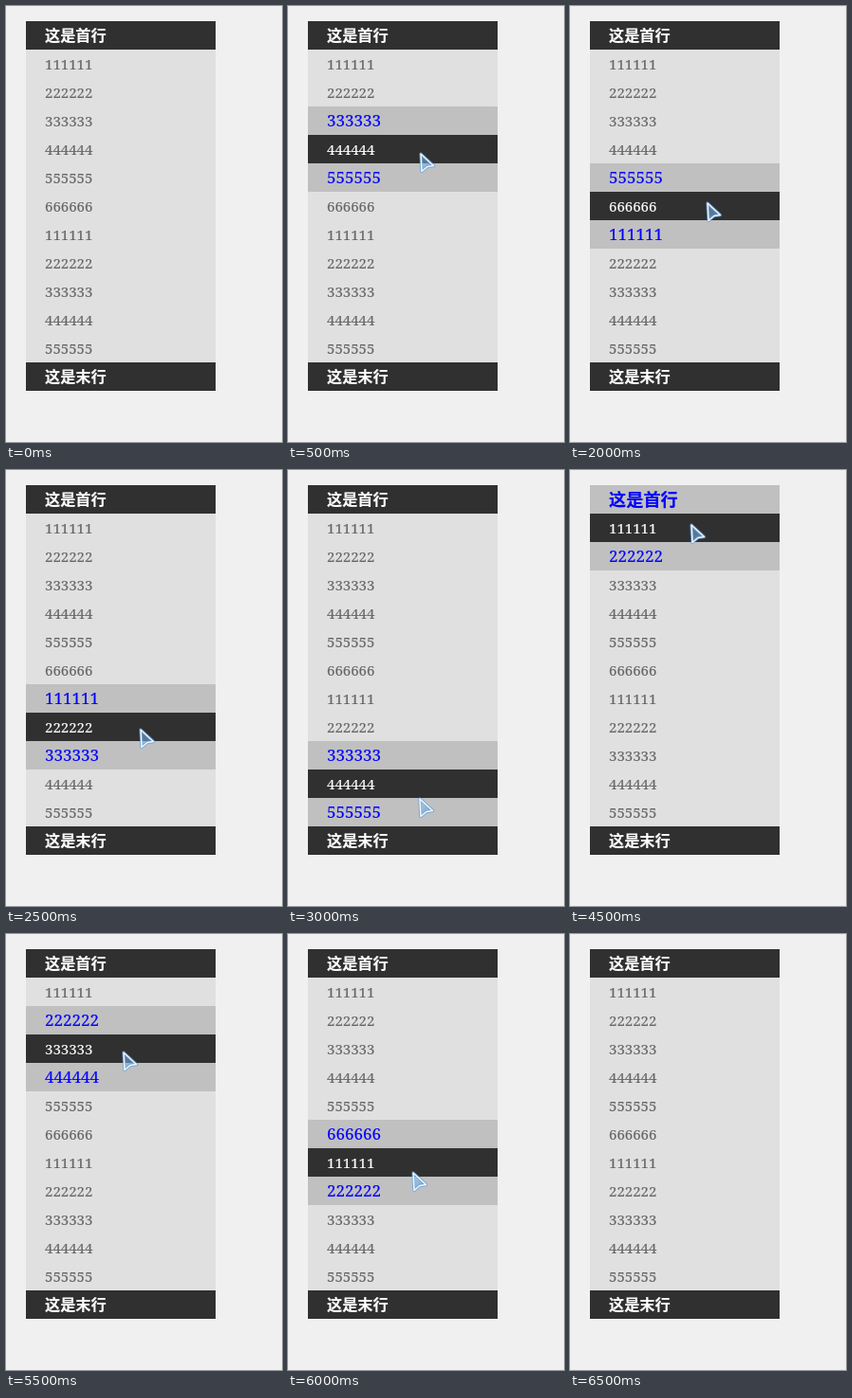
These frames come from a looping animation (291x460 px, 7 s). An HTML page:

```html
<!DOCTYPE html>
<html lang="zh-CN">
<head>
<meta charset="utf-8">
<style>
  html, body { margin: 0; width: 100%; height: 100%; overflow: hidden; background: #f0f0f0; }
  #list { position: absolute; left: 21px; top: 16px; width: 200px; }
  .row {
    box-sizing: border-box; height: 30px; padding-left: 20px; overflow: hidden;
    font: 15px/30px "Noto Serif", serif;
    -webkit-text-stroke: .15px currentColor;
    white-space: nowrap; color: #666; background: #e0e0e0;
  }
  .edge { font: 700 16.2px/28px "Noto Sans CJK SC", "Noto Sans CJK", sans-serif; }
  .edge, .row.hover { color: #fff; background: #303030; }
  .row.near { color: #00f; background: #c0c0c0; font-size: 17px; }
  .edge.near { font-size: 18.2px; }
  #cursor { position: absolute; left: 0; top: 0; overflow: visible; }
</style>
</head>
<body>
<div id="list"></div>
<svg id="cursor" width="20" height="25" viewBox="0 0 20 25">
  <defs>
    <linearGradient id="glass" x1="0" y1="0" x2="1" y2="1">
      <stop offset="0" stop-color="#a4caf0" stop-opacity=".4"/>
      <stop offset="1" stop-color="#4390dc" stop-opacity=".75"/>
    </linearGradient>
    <path id="arrow" d="M2 2 L15.5 14.5 L9 15.5 L3 20.5 Z" stroke-linejoin="round"/>
  </defs>
  <use href="#arrow" fill="none" stroke="#5b9bd5" stroke-opacity=".65" stroke-width="3.4"/>
  <use href="#arrow" fill="url(#glass)" stroke="#eef7ff" stroke-width="1.5"/>
</svg>
<script>
  const LOOP = 7000, BEAT = 500, TOP = 16, ROW = 30;
  const ENTER = 500, LEAVE = 6500, HOLD = 3;   // the pointer rests HOLD beats at its first stop
  const TRAIL = 0.15;                          // the highlight trails the pointer slightly
  const stops = [
    [138, 154], [143, 206], [140, 272], [137, 345], [138, 359],
    [138, 125], [126, 56], [109, 147], [122, 123], [130, 250]
  ];

  const list = document.getElementById('list');
  const cursor = document.getElementById('cursor');
  const digits = Array.from({ length: 11 }, (_, i) => String(i % 6 + 1).repeat(6));
  const rows = ['这是首行', ...digits, '这是末行'].map((text, i, all) => {
    const row = document.createElement('div');
    row.className = i % (all.length - 1) ? 'row' : 'row edge';
    row.textContent = text;
    list.append(row);
    return row;
  });

  function rowUnder(i) {
    const y = stops[i][1];
    const before = stops[Math.max(0, i - 1)][1];
    return Math.floor((y + (before - y) * TRAIL - TOP) / ROW);
  }

  function show(t) {
    const inside = t >= ENTER && t < LEAVE;
    const i = Math.max(0, Math.floor((t - ENTER) / BEAT) - HOLD + 1);
    const hover = inside ? rowUnder(i) : NaN;
    rows.forEach((row, n) => {
      row.classList.toggle('hover', n === hover);
      row.classList.toggle('near', Math.abs(n - hover) === 1);
    });
    cursor.style.display = inside ? 'block' : 'none';
    if (inside) cursor.style.transform = `translate(${stops[i][0]}px, ${stops[i][1]}px)`;
  }

  const start = performance.now();
  function frame() {
    show((performance.now() - start) % LOOP);
    requestAnimationFrame(frame);
  }
  frame();
</script>
</body>
</html>
```
